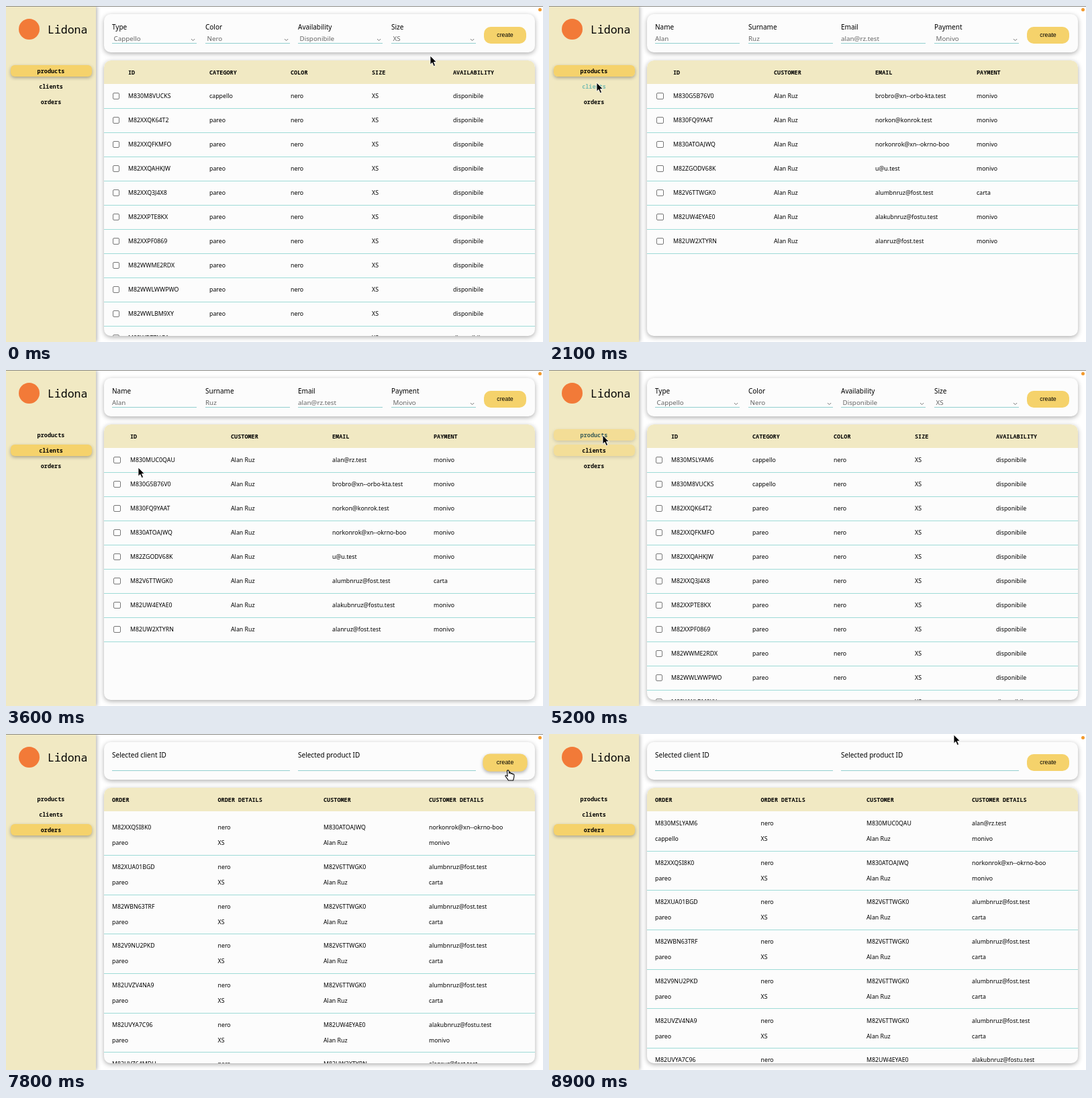
Animation, 800 px wide and 500 px high, one loop 9 s. Source, as an HTML page:

```html
<!DOCTYPE html>
<html lang="en">
<head>
<meta charset="utf-8">
<title>Shop manager</title>
<style>
html, body { margin: 0; width: 100%; height: 100%; overflow: hidden; background: #fff; }
#stage { position: relative; width: 800px; height: 500px; overflow: hidden; background: #fff;
  font: 500 8.8px/20px "Noto Sans", sans-serif; color: #000; }
#stage div, #stage span, #stage svg { position: absolute; box-sizing: border-box; }
span { white-space: pre; }
.topline { width: 800px; height: 1px; background: #8b8a86; }
.dot { left: 792.5px; top: 2.5px; width: 5px; height: 5px; border-radius: 50%; background: #f39a2d; }
.side { width: 134px; height: 500px; background: #f1e9c3; box-shadow: 1px 0 6px rgba(0,0,0,.35); }
.logo { left: 19px; top: 19px; width: 31px; height: 31px; border-radius: 50%; background: #f27a38; }
.brand { font: 16.5px/24px "Noto Sans Mono", monospace; }
.nav { left: 6.5px; width: 121px; height: 17px; border-radius: 6px; text-align: center;
  font: 600 8.5px/17px "Noto Sans Mono", monospace; }
.page { width: 800px; height: 500px; }
.panel { left: 146px; width: 642px; border-radius: 10px; background: #fcfcfc;
  box-shadow: 0 2px 7px rgba(0,0,0,.32); }
.table { height: 410px; overflow: hidden; }
.clip { inset: 0; overflow: hidden; border-radius: 10px; }
.head { width: 642px; height: 35px; background: #f1e9c3; font: 600 8.5px/20px "Noto Sans Mono", monospace; }
.rows { top: 35.9px; width: 642px; }
#stage .row { position: relative; overflow: hidden; border-bottom: 1px solid #9edbd7; }
.label { font-size: 10px; }
.value { font-size: 9.8px; font-weight: 400; color: #666; }
.line { height: 1px; background: #93cfcf; }
.create { left: 712px; width: 63px; height: 25px; border-radius: 10px; background: #f5d26b;
  text-align: center; font: 500 8.8px/25px "Liberation Sans", Arial, sans-serif; }
.box { top: 12px; width: 10.5px; height: 10.5px; border: 1px solid #777; border-radius: 2px; background: #fff; }
.box.on { background: #1a73e8; border-color: #1a73e8; }
.box.on::after { content: ""; position: absolute; left: 2.6px; top: .4px; width: 2.4px; height: 5px;
  border: solid #fff; border-width: 0 1.4px 1.4px 0; transform: rotate(42deg); }
#stage svg { overflow: visible; }
</style>
</head>
<body>
<div id="stage"></div>
<script>
const stage = document.getElementById("stage");
const LOOP = 9000;

function add(parent, cls, style = {}, text = "", tag = "div") {
  const el = document.createElement(tag);
  el.className = cls;
  for (const k in style) el.style[k] = typeof style[k] === "number" ? style[k] + "px" : style[k];
  el.textContent = text;
  parent.append(el);
  return el;
}
// Text starting at x, centred vertically on y
const write = (parent, x, y, text, cls = "") =>
  add(parent, cls, { left: x, top: y - 10 }, text, "span");

function svg(parent, path, attrs) {
  const holder = add(parent, "");
  holder.innerHTML = `<svg width="1" height="1"><path d="${path}" ${attrs}/></svg>`;
  return holder;
}

function field(parent, x, width, label, value, lineY, select) {
  write(parent, x, 31, label, "label");
  add(parent, "line", { left: x, top: lineY, width });
  if (select) {
    const arrow = svg(parent, "M0 0L2.6 2.6L5.2 0", 'fill="none" stroke="#777"');
    arrow.style.left = x + width - 8 + "px";
    arrow.style.top = "48.5px";
  }
  return write(parent, x + (select ? 2.5 : 0), lineY - 5.6, value, "value");
}

function makePage(spec) {
  const { top, rowHeight, columns, heads, data, boxX, lineGap } = spec;
  const page = add(stage, "page");
  add(page, "panel", { top: 12, height: top - 24 });
  const fields = spec.fields.map(f => field(page, ...f));
  const create = add(page, "create", { top: top - 50 }, "create");
  const clip = add(add(page, "panel table", { top }), "clip");
  const head = add(clip, "head");
  heads.forEach((h, i) => write(head, columns[i] - 146, 18, h));
  const list = add(clip, "rows");
  const rows = data.map(cells => {
    const row = add(list, "row", { height: rowHeight });
    if (boxX) add(row, "box", { left: boxX - 146 });
    cells.forEach((c, i) => {
      const n = columns.length;
      write(row, columns[i % n] - 146, 17.2 + lineGap * Math.floor(i / n), c);
    });
    return row;
  });
  return { page, fields, create, rowHeight, first: rows[0], box: rows[0].querySelector(".box") };
}

add(stage, "side");
add(stage, "logo");
write(stage, 62, 33, "Lidona", "brand");
const navs = ["products", "clients", "orders"].map((n, i) => add(stage, "nav", { top: 87.5 + 23 * i }, n));

const quarter = [158, 297, 435, 574];
const productIds = ("M830MSLYAM6 M830M8VUCKS M82XXQK64T2 M82XXQFKMFO M82XXQAHKJW M82XXQ3J4X8 " +
  "M82XXPTE8KX M82XXPF0869 M82WWME2RDX M82WWLWWPWO M82WWLBM9XY M82WDTZNG1").split(" ");
const products = makePage({
  top: 81, rowHeight: 36, boxX: 158.7, lineGap: 0,
  columns: [182, 303, 424, 545, 666],
  heads: ["ID", "CATEGORY", "COLOR", "SIZE", "AVAILABILITY"],
  fields: [["Type", "Cappello"], ["Color", "Nero"], ["Availability", "Disponibile"], ["Size", "XS"]]
    .map(([l, v], i) => [quarter[i], 126, l, v, 55, true]),
  data: productIds.map((id, i) => [id, i < 2 ? "cappello" : "pareo", "nero", "XS", "disponibile"])
});

const person = "Alan Ruz";
const mails = {
  M830MUC0QAU: "alan@rz.test",
  M830G5B76V0: "brobro@xn--orbo-kta.test",
  M830FQ9YAAT: "norkon@konrok.test",
  M830ATOAJWQ: "norkonrok@xn--okrno-boo",
  M82ZGODV68K: "u@u.test",
  M82V6TTWGK0: "alumbnruz@fost.test",
  M82UW4EYAE0: "alakubnruz@fostu.test",
  M82UW2XTYRN: "alanruz@fost.test"
};
const payment = id => id === "M82V6TTWGK0" ? "carta" : "monivo";
const clients = makePage({
  top: 81, rowHeight: 36, boxX: 160, lineGap: 0,
  columns: [185, 335, 486, 637],
  heads: ["ID", "CUSTOMER", "EMAIL", "PAYMENT"],
  fields: [["Name", "Alan"], ["Surname", "Ruz"], ["Email", "alan@rz.test"], ["Payment", "Monivo"]]
    .map(([l, v], i) => [quarter[i], 126, l, v, 55, i === 3]),
  data: Object.keys(mails).map(id => [id, person, mails[id], payment(id)])
});

const sales = [
  ["M830MSLYAM6", "M830MUC0QAU"], ["M82XXQSI8K0", "M830ATOAJWQ"],
  ["M82XUA01BGD", "M82V6TTWGK0"], ["M82WBN63TRF", "M82V6TTWGK0"],
  ["M82V9NU2PKD", "M82V6TTWGK0"], ["M82UVZV4NA9", "M82V6TTWGK0"],
  ["M82UVYA7C96", "M82UW4EYAE0"], ["M82UVZ64MDU", "M82UW2XTYRN"]
];
const orders = makePage({
  top: 80, rowHeight: 58.7, lineGap: 23,
  columns: [158, 315.5, 473, 630],
  heads: ["ORDER", "ORDER DETAILS", "CUSTOMER", "CUSTOMER DETAILS"],
  fields: [[158, 265, "Selected client ID", "M830MUC0QAU", 54],
    [435, 265, "Selected product ID", "M830MSLYAM6", 54]],
  data: sales.map(([id, c], i) =>
    [id, "nero", c, mails[c], i ? "pareo" : "cappello", "XS", person, payment(c)])
});

const topline = add(stage, "topline");
add(stage, "dot");
const arrow = svg(stage, "M0 0V13.2L3 10.4L5.2 15.6L7.6 14.6L5.4 9.6H9.4Z",
  'stroke="#fff" stroke-width=".9"');
const hand = svg(stage, "M-1.5 1.2C-1.5-.6 1-.6 1.2 1.2L1.8 5C2-.1 4 4 4.2 5.4C4.6 4.2 6.4 4.4 6.6 6" +
  "C7.2 5.2 9 5.6 9 7.2C9.2 10.5 8.4 12 7.6 15H.4C-.8 12.6-2.6 11-4 8.8C-4.6 7.4-2.6 6.8-.8 9Z",
  'fill="#fff" stroke="#000" stroke-width="1.1" stroke-linejoin="round"');

// Cursor stops: time, x, y
const stops = [
  [0, 632, 74], [550, 742, 46], [1050, 742, 46], [1950, 71, 114], [2200, 71, 114],
  [2750, 745, 50], [3050, 745, 50], [3600, 197, 145], [3850, 165, 133], [4250, 165, 133],
  [4950, 80, 97], [5250, 80, 97], [5700, 164, 133], [6000, 164, 133], [6550, 82, 142],
  [6800, 82, 142], [7450, 748, 54], [8050, 748, 54], [8700, 603, 1], [LOOP, 603, 1]
];
const visits = [[-1000, 0], [2090, 1], [5080, 0], [6690, 2]];
const pages = [products, clients, orders];
const created = [780, 2930, 7720];

const ease = v => { v = Math.min(1, Math.max(0, v)); return v * v * (3 - 2 * v); };

function cursorAt(t) {
  const i = stops.findIndex(s => s[0] > t);
  const [t0, x0, y0] = stops[i - 1], [t1, x1, y1] = stops[i];
  const p = ease((t - t0) / (t1 - t0));
  return [x0 + (x1 - x0) * p, y0 + (y1 - y0) * p];
}

function draw(t) {
  const [x, y] = cursorAt(t);
  const k = visits.findLastIndex(v => v[0] <= t);
  const current = visits[k][1], previous = k ? visits[k - 1][1] : -1;
  const turn = ease((t - visits[k][0]) / 240);

  navs.forEach((nav, i) => {
    const w = i === current ? turn : i === previous ? 1 - turn : 0;
    const hover = x > 7 && x < 127 && Math.abs(y - 96 - 23 * i) < 9;
    nav.style.background = `rgba(245,210,107,${w})`;
    nav.style.boxShadow = `0 2px 5px rgba(0,0,0,${0.3 * w})`;
    nav.style.color = `color-mix(in srgb, #76bdb2 ${hover ? 100 * (1 - w) : 0}%, #000)`;
  });

  const onCreate = x > 712 && x < 775 && y > 30 && y < 56;
  pages.forEach((p, i) => {
    p.page.style.display = i === current ? "" : "none";
    const grow = ease((t - created[i]) / 400);
    p.first.style.height = p.rowHeight * grow + "px";
    p.first.style.display = grow ? "" : "none";
    p.first.style.opacity = Math.max(0, 2 * grow - 1);
    p.create.style.transform = onCreate ? "scale(1.05)" : "";
    p.create.style.boxShadow = onCreate ? "0 2px 5px rgba(0,0,0,.3)" : "";
  });
  clients.box.classList.toggle("on", t >= 3950);
  products.box.classList.toggle("on", t >= 5850);
  orders.fields.forEach(f => f.style.visibility = t < created[2] ? "" : "hidden");

  // The window edge clears when the cursor touches the top
  topline.style.display = y < 3 ? "none" : "";
  arrow.style.display = onCreate ? "none" : "";
  hand.style.display = onCreate ? "" : "none";
  arrow.style.transform = hand.style.transform = `translate(${x}px,${y}px)`;
}

const start = performance.now();
function tick() {
  draw((performance.now() - start) % LOOP);
  requestAnimationFrame(tick);
}
tick();
</script>
</body>
</html>
```
